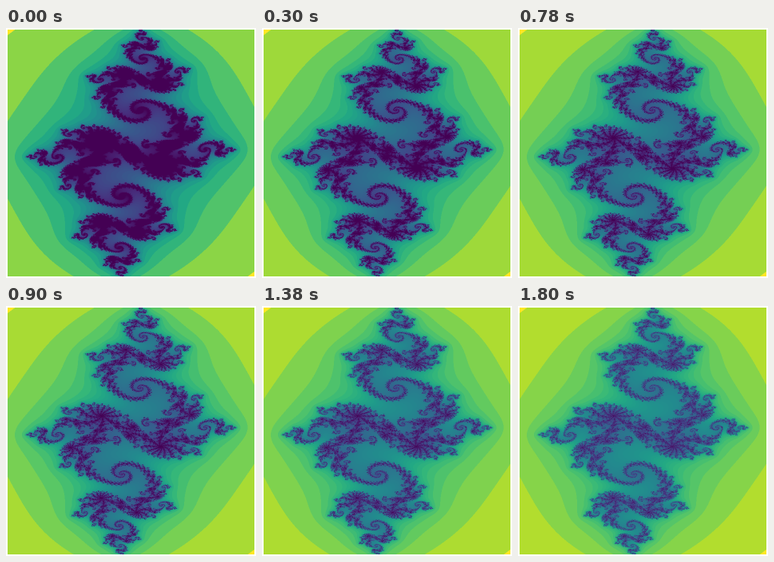
An HTML page with a canvas for the animation above (2100 ms loop, 313 by 313 pixels).

```html
<!DOCTYPE html>
<html lang="en">
<head>
<meta charset="utf-8">
<title>Julia set</title>
<style>
  html, body { margin: 0; width: 100%; height: 100%; overflow: hidden; background: #fff; }
  canvas { display: block; }
</style>
</head>
<body>
<canvas id="stage" width="313" height="313"></canvas>
<script>
const SIZE = 309, PAD = 2, SUB = 2;
const STEP = 300;
const LIMITS = [55, 125, 195, 215, 310, 370, 430];
const C = { re: -0.79, im: 0.15 };
const RADIUS = 10;
const VIRIDIS = ('440154 481a6c 472f7d 414487 39568c 31688e 2a788e 23888e ' +
  '1f988b 22a884 35b779 54c568 7ad151 a5db36 d2e21b fde725').split(' ')
  .map(h => [0, 2, 4].map(i => parseInt(h.slice(i, i + 2), 16)));

const ctx = document.getElementById('stage').getContext('2d');
const maxCount = Math.max(...LIMITS);
const grid = SIZE * SUB;

// Index of the last step that stays within the radius.
function escapeCount(re, im) {
  for (let n = 0; n < maxCount; n++) {
    const next = re * re - im * im + C.re;
    im = 2 * re * im + C.im;
    re = next;
    if (re * re + im * im > RADIUS * RADIUS) return n;
  }
  return maxCount;
}

// The real axis runs downwards, the imaginary axis to the right.
function countGrid() {
  const counts = new Uint16Array(grid * grid);
  for (let row = 0; row < grid; row++) {
    const re = 3 * row / grid - 1.5;
    for (let col = 0; col < grid; col++) {
      counts[row * grid + col] = escapeCount(re, 2 * col / grid - 1);
    }
  }
  return counts;
}

function viridis(v) {
  const p = Math.min(Math.max(v, 0), 1) * (VIRIDIS.length - 1);
  const i = Math.min(Math.floor(p), VIRIDIS.length - 2);
  return VIRIDIS[i].map((a, k) => a + (VIRIDIS[i + 1][k] - a) * (p - i));
}

// Logarithmic colour scale from one step up to the limit.
function palette(limit) {
  return Array.from({ length: maxCount + 1 }, (_, n) =>
    viridis(1 - Math.log(Math.min(Math.max(n, 1), limit)) / Math.log(limit)));
}

function paint(counts, limit) {
  const colors = palette(limit);
  const img = ctx.createImageData(SIZE, SIZE);
  for (let y = 0; y < SIZE; y++) {
    for (let x = 0; x < SIZE; x++) {
      let r = 0, g = 0, b = 0;
      for (let j = 0; j < SUB; j++) {
        for (let i = 0; i < SUB; i++) {
          const c = colors[counts[(y * SUB + j) * grid + x * SUB + i]];
          r += c[0]; g += c[1]; b += c[2];
        }
      }
      const area = SUB * SUB;
      img.data.set([r / area, g / area, b / area, 255], (y * SIZE + x) * 4);
    }
  }
  return img;
}

const counts = countGrid();
const images = LIMITS.map(limit => paint(counts, limit));
let shown = -1;

function draw(now) {
  const index = Math.floor(now / STEP) % images.length;
  if (index !== shown) {
    ctx.putImageData(images[index], PAD, PAD);
    shown = index;
  }
}

const start = performance.now();
function tick() {
  draw(performance.now() - start);
  requestAnimationFrame(tick);
}
draw(0);
tick();
</script>
</body>
</html>
```
